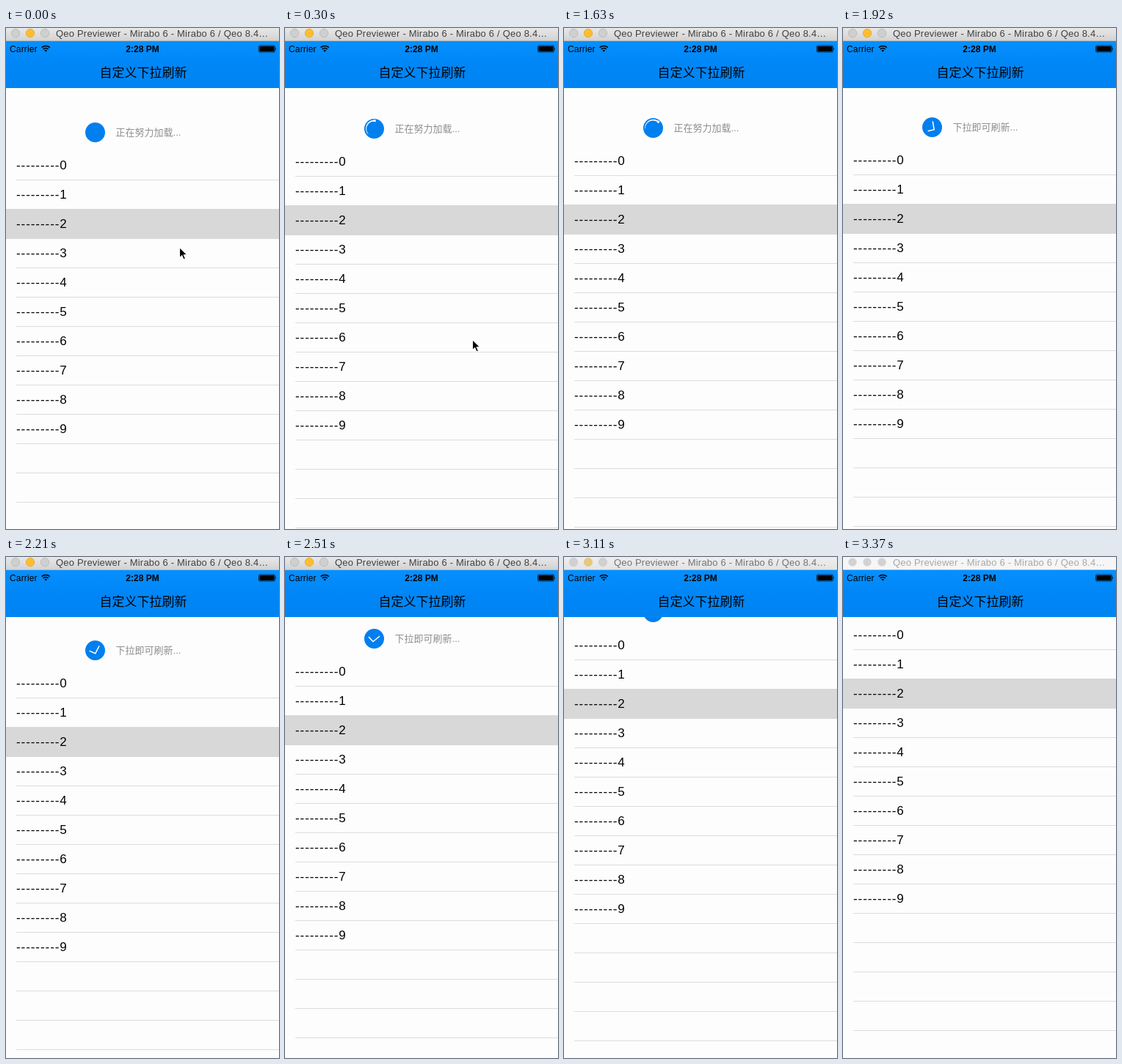
Write an HTML page that moves like this. It is 372 px wide and 684 px high and loops after 3410 ms.

```html
<!DOCTYPE html>
<html lang="zh">
<head>
<meta charset="utf-8">
<title>自定义下拉刷新</title>
<style>
  html, body { margin: 0; width: 100%; height: 100%; overflow: hidden; background: #fdfdfd; }
  svg { display: block; width: 372px; height: 684px; }
  text { font-family: "Liberation Sans", Arial, "Noto Sans CJK SC", sans-serif; white-space: pre; }
  .cjk { font-family: "Noto Sans CJK SC", "Noto Sans CJK", sans-serif; }
  .row { font-size: 17px; letter-spacing: .93px; }
  .hint { font-size: 13px; fill: #8e8e8e; }
  .caption { font-size: 13px; letter-spacing: .2px; }
</style>
</head>
<body>
<svg viewBox="0 0 372 684">
  <defs>
    <linearGradient id="chrome" x2="0" y2="1">
      <stop stop-color="#e8e8e8"/><stop offset="1" stop-color="#d2d2d2"/>
    </linearGradient>
    <linearGradient id="nav" x2="0" y2="1">
      <stop stop-color="#0690ff"/><stop offset=".5" stop-color="#0086f6"/><stop offset="1" stop-color="#0084f2"/>
    </linearGradient>
  </defs>
  <rect width="372" height="684" fill="#fdfdfd"/>

  <g id="content">
    <g transform="translate(121.5 142.5)">
      <circle r="13.5" fill="#007fee"/>
      <g id="spinner" fill="#fff"><path id="comet"/><circle id="head" r="1.7"/></g>
      <path id="check" d="M-7.5-2.5L-1.5 4L7.5-3.5" fill="none" stroke="#fff" stroke-width="1.5"/>
    </g>
    <text x="149.5" y="147" class="hint"><tspan id="hint" class="cjk"></tspan>...</text>
    <g id="list"></g>
  </g>

  <rect y="17" width="372" height="65" fill="url(#nav)"/>
  <text x="5" y="32.5" font-size="12" letter-spacing=".15">Carrier</text>
  <g fill="none" stroke="#000" stroke-width="1.7">
    <path d="M48.7 26.7A8 8 0 0 1 59.7 26.7M50.7 29A5 5 0 0 1 57.7 29"/>
    <path d="M54.2 32.6L52.4 30.7A2.6 2.6 0 0 1 56 30.7Z" fill="#000" stroke="none"/>
  </g>
  <text x="186" y="32.5" font-size="12" font-weight="700" text-anchor="middle">2:28 PM</text>
  <rect x="344.5" y="24" width="22" height="9" rx="1.5" fill="none" stroke="#000" stroke-width=".7"/>
  <rect x="345.5" y="25" width="20" height="7" rx=".8"/>
  <path d="M367.4 26.7Q369 28.5 367.4 30.3Z"/>
  <text x="127.5" y="66.5" class="cjk" font-size="17" font-weight="500">自定义下拉刷新</text>

  <rect width="372" height="17.5" fill="#f6f6f6"/>
  <g id="idle" fill="#d2d2d2"></g>
  <g id="active">
    <rect width="372" height="17.5" fill="url(#chrome)"/>
    <rect y="17" width="372" height=".7" fill="#b4b4b4"/>
  </g>

  <path id="cursor" d="M.5.7V14.8L3.7 11.8L6 17L8.6 15.9L6.3 10.8H11Z" stroke="#fff" stroke-width="1.1"/>
</svg>

<script>
const LOOP = 3410;
const CAPTION = 'Qeo Previewer - Mirabo 6 - Mirabo 6 / Qeo 8.4…';

// start time, list offset, pointer x and y
const STEPS = [
  [0, 0, 236, 299], [150, -3, 246, 360], [300, -5, 255, 425], [440, -6, 262, 469],
  [590, -6, 262, 469], [740, -6, 313, 400], [880, -6], [1030, -6], [1180, -6],
  [1330, -6, 324, 567], [1480, -6, 338, 634], [1630, -6], [1780, -6],
  [1920, -7], [2070, -10], [2210, -15], [2360, -22.5], [2510, -31],
  [2660, -40], [2810, -51], [2960, -60], [3110, -67], [3230, -74], [3370, -81]
];
const SPIN = [300, 1780];
const TURN = { 1920: -60, 2070: -42, 2210: -23, 2360: -8 };

const $ = id => document.getElementById(id);

function add(parent, tag, attrs, text = '') {
  const el = document.createElementNS('http://www.w3.org/2000/svg', tag);
  for (const key in attrs) el.setAttribute(key, attrs[key]);
  el.textContent = text;
  parent.append(el);
  return el;
}

function buildList() {
  const list = $('list');
  for (let i = 0; i < 15; i++)
    add(list, 'rect', { x: 14, y: 207 + 40 * i, width: 358, height: 1, fill: '#dcdcdc' });
  add(list, 'rect', { y: 247, width: 372, height: 41, fill: '#d8d8d8' });
  for (let i = 0; i < 10; i++)
    add(list, 'text', { x: 14, y: 193 + 40 * i, class: 'row' }, '---------' + i);
}

function buildCaption() {
  for (const [id, color] of [['idle', '#a8a8a8'], ['active', '#404040']]) {
    const bar = $(id);
    for (let i = 0; i < 3; i++) {
      const dot = add(bar, 'circle', { cx: 13 + 20 * i, cy: 7, r: 5.7 });
      if (id === 'active') {
        dot.setAttribute('fill', i === 1 ? '#ffbd2e' : '#cfcfcf');
        dot.setAttribute('stroke', i === 1 ? '#dfa023' : '#b0b0b0');
        dot.setAttribute('stroke-width', .7);
      }
    }
    add(bar, 'text', { x: 68, y: 12, class: 'caption', fill: color }, CAPTION);
  }
}

// Tapered arc of 135 degrees whose thick end lies at angle 0
function buildComet() {
  const outer = [], inner = [], n = 24, r = 10.9;
  for (let i = 0; i <= n; i++) {
    const a = (i / n - 1) * Math.PI * .75, w = .3 + .7 * i / n;
    const at = d => [(d * Math.cos(a)).toFixed(2), (d * Math.sin(a)).toFixed(2)].join(' ');
    outer.push(at(r + w));
    inner.unshift(at(r - w));
  }
  $('comet').setAttribute('d', 'M' + outer.concat(inner).join('L') + 'Z');
  $('head').setAttribute('cx', r);
}

function show(el, on) { el.style.display = on ? '' : 'none'; }
function move(el, x, y) { el.setAttribute('transform', `translate(${x} ${y})`); }
function rotate(el, deg) { el.setAttribute('transform', `rotate(${deg})`); }

let last;
function draw() {
  const now = performance.now() % LOOP;
  const step = STEPS.findLast(s => s[0] <= now);
  if (step !== last) {
    last = step;
    const [t, shift, x, y] = step;
    move($('content'), 0, shift);
    $('hint').textContent = t < 1780 ? '正在努力加载' : '下拉即可刷新';
    show($('spinner'), t >= SPIN[0] && t < SPIN[1]);
    rotate($('spinner'), (t - 590) * .298);
    show($('check'), t >= 1920);
    rotate($('check'), TURN[t] || 0);
    show($('cursor'), x !== undefined);
    if (x !== undefined) move($('cursor'), x, y);
    $('active').setAttribute('opacity', t < 3110 ? 1 : t < 3230 ? .5 : 0);
  }
  requestAnimationFrame(draw);
}

buildList();
buildCaption();
buildComet();
draw();
</script>
</body>
</html>
```
